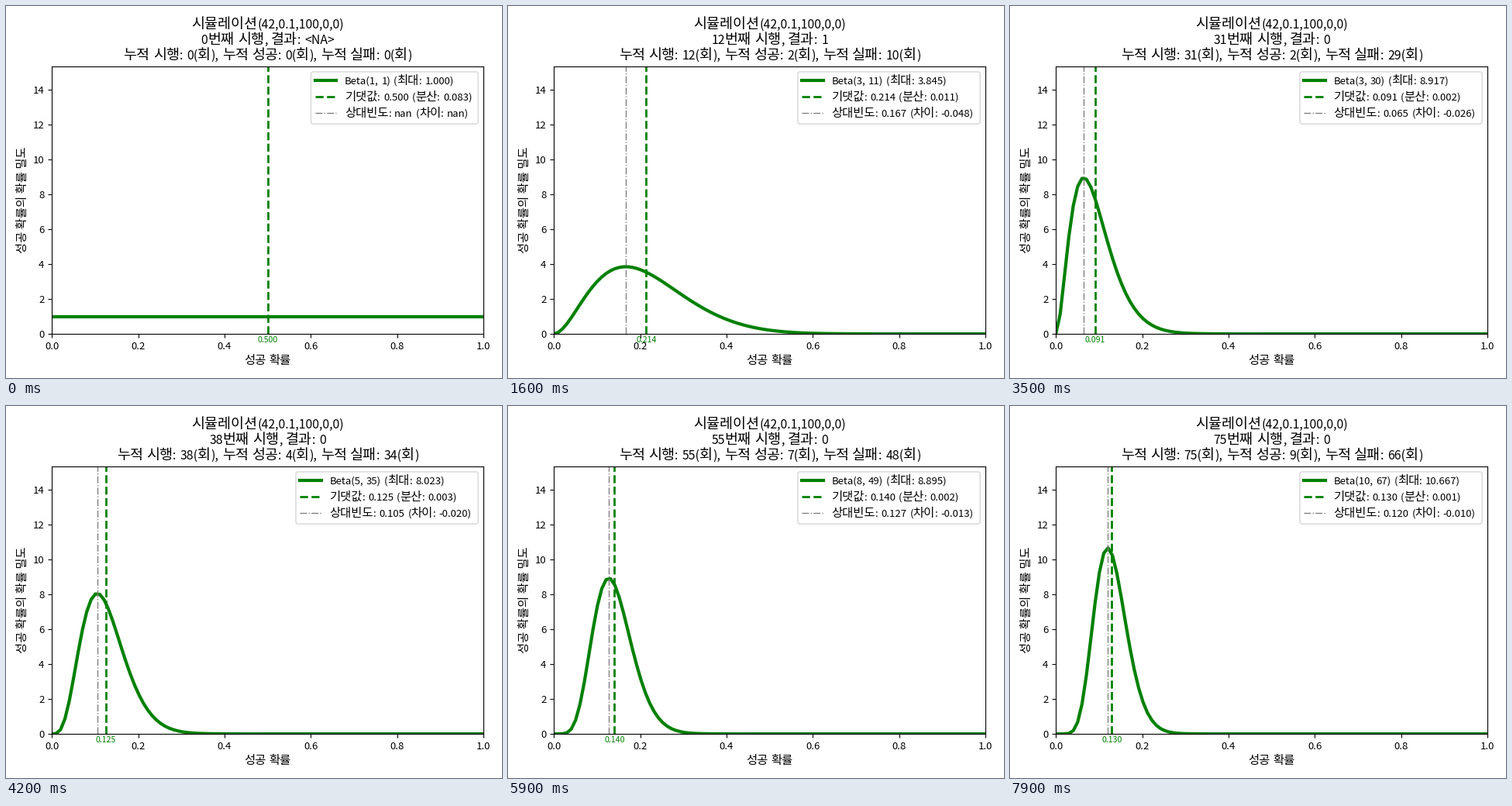
Recreate the animation shown at these times as a matplotlib script. Size 640 px wide and 480 px high, loop 8000 ms.

```python
import math
from functools import lru_cache
from itertools import groupby

import matplotlib.pyplot as plt
import numpy as np
from matplotlib.animation import FuncAnimation
from matplotlib.lines import Line2D
from matplotlib.patches import FancyBboxPatch
from matplotlib.textpath import TextPath
from matplotlib.transforms import IdentityTransform

FONT = "Noto Sans CJK JP"
HANGUL, LATIN, SPACE = 1.11, 0.95, 1.22     # optical sizes
W, H, DPI = 640, 480, 100
LEFT, RIGHT, TOP, BOTTOM = 59.13, 616.13, 78, 423
TRIALS = 100
HOLD = 5                        # ticks spent on the empty state

plt.rcParams["font.family"] = FONT

hits = np.random.RandomState(42).rand(TRIALS) > 0.9
wins = np.concatenate([[0], np.cumsum(hits)])
xs = np.linspace(0, 1, 100)


def beta_pdf(a, b):
    norm = math.exp(math.lgamma(a + b) - math.lgamma(a) - math.lgamma(b))
    return norm * xs ** (a - 1) * (1 - xs) ** (b - 1)


fig = plt.figure(figsize=(W / DPI, H / DPI), dpi=DPI)
ax = fig.add_axes([LEFT / W, 1 - BOTTOM / H, (RIGHT - LEFT) / W, (BOTTOM - TOP) / H])
ax.set_xlim(0, 1)
ax.set_ylim(0, 1.1 * beta_pdf(1 + wins[-1], 1 + TRIALS - wins[-1]).max())
ax.set_yticks(range(0, 15, 2))
ax.tick_params(labelsize=10 * LATIN)

PIX = dict(transform=IdentityTransform())


def scale(c):
    if c == " ":
        return SPACE
    return HANGUL if "가" <= c <= "힣" else LATIN


@lru_cache(None)
def advance(s, size):
    def span(t):
        return TextPath((0, 0), t, size=size * DPI / 72, prop={"family": FONT}).get_extents().width
    return span("|" + s + "|") - span("||")


def write(x, y, s, size, center=False):
    """Set mixed Hangul and Latin text on the baseline y, measured from the top."""
    runs = []
    for factor, chars in groupby(s, scale):
        part = "".join(chars)
        runs.append((part, size * factor, advance(part, size * factor)))
    if center:
        x -= sum(r[2] for r in runs) / 2
    out = []
    for part, pt, w in runs:
        if part != " ":
            out.append(fig.text(x, H - y, part, fontsize=pt, **PIX))
        x += w
    return out


mid_x, mid_y = (LEFT + RIGHT) / 2, (TOP + BOTTOM) / 2
write(mid_x, 29, "시뮬레이션(42,0.1,100,0,0)", 12, True)
write(mid_x, 462, "성공 확률", 10, True)
fig.text(26, H - mid_y, "성공 확률의 확률 밀도", fontsize=10 * HANGUL, rotation=90,
         ha="center", va="baseline", rotation_mode="anchor", **PIX)

STYLES = [dict(color="green", lw=3, ls="-"),
          dict(color="green", lw=2, ls="--"),
          dict(color="gray", lw=1, ls="-.")]
curve, = ax.plot(xs, xs, **STYLES[0])
mean_line = ax.axvline(0, **STYLES[1])
freq_line = ax.axvline(0, **STYLES[2])
mean_tag = fig.text(0, H - 434, "", fontsize=8 * LATIN, color="green", ha="center", **PIX)

temp = []


def legend(x, rows):
    left, right = x - 44, RIGHT - 6.94
    top, bottom = TOP + 6.94, TOP + 74.1
    box = FancyBboxPatch((left, H - bottom), right - left, bottom - top,
                         boxstyle="round,pad=0,rounding_size=2.8",
                         fc=(1, 1, 1, 0.8), ec=(0.8, 0.8, 0.8, 0.8), lw=1, **PIX)
    temp.append(fig.add_artist(box))
    for i, (row, style) in enumerate(zip(rows, STYLES)):
        y = H - 95.9 - 20.9 * i
        key = Line2D([x - 38.9, x - 11.1], [y, y], **style, **PIX)
        temp.append(fig.add_artist(key))
        temp.extend(write(x - 0.6, 101 + 21 * i, row, 10))


def draw(tick):
    while temp:
        temp.pop().remove()
    n = max(0, tick - HOLD + 1)
    k = int(wins[n])
    a, b = 1 + k, 1 + n - k
    pdf = beta_pdf(a, b)
    mean = a / (a + b)
    var = a * b / ((a + b) ** 2 * (a + b + 1))
    freq = k / n if n else math.nan
    result = int(hits[n - 1]) if n else "<NA>"

    curve.set_ydata(pdf)
    mean_line.set_xdata([mean, mean])
    freq_line.set_xdata([freq, freq])
    freq_line.set_visible(n > 0)
    mean_tag.set_text(f"{mean:.3f}")
    mean_tag.set_x(LEFT + mean * (RIGHT - LEFT))

    temp.extend(write(mid_x, 49, f"{n}번째 시행, 결과: {result}", 12, True))
    temp.extend(write(mid_x, 69, f"누적 시행: {n}(회), 누적 성공: {k}(회), 누적 실패: {n - k}(회)", 12, True))
    diff = f"{freq - mean:.3f}"
    text_x = 437.5 if not n else 418 if diff[0] == "-" else 423.5
    legend(text_x, [f"Beta({a}, {b}) (최대: {pdf.max():.3f})",
                    f"기댓값: {mean:.3f} (분산: {var:.3f})",
                    f"상대빈도: {freq:.3f} (차이: {diff})"])
    return []


anim = FuncAnimation(fig, draw, frames=80, interval=100, init_func=lambda: draw(0),
                     repeat=True, repeat_delay=0, blit=False)
plt.show()
```
